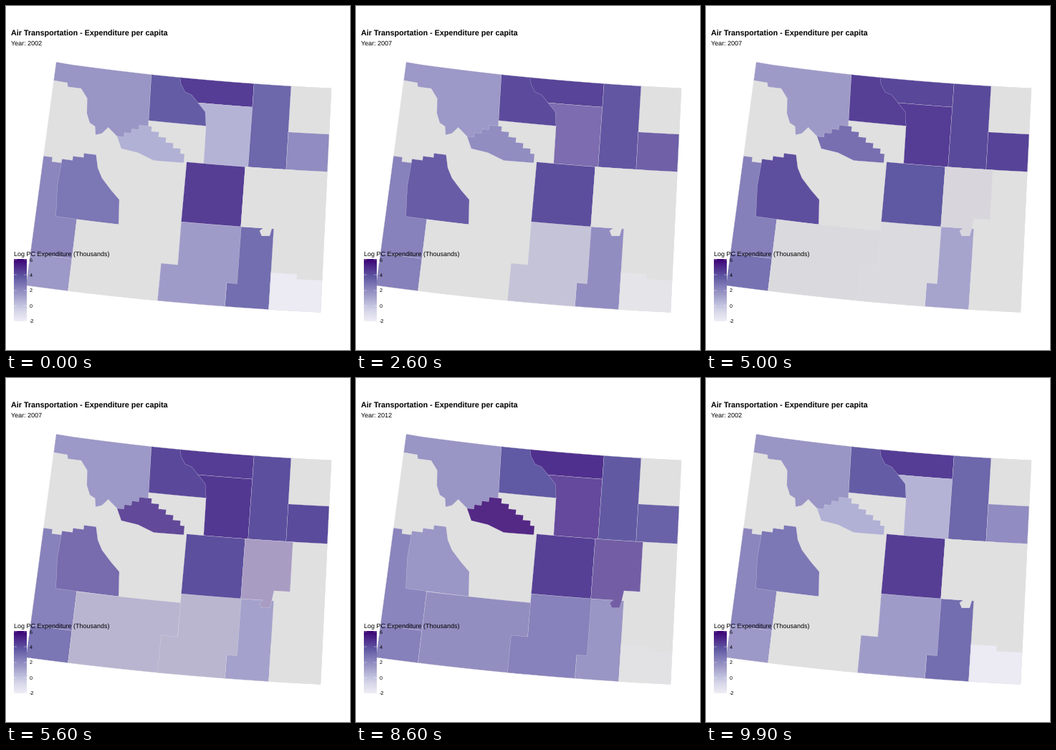
A matplotlib script for the animation above (10000 ms loop, 480 by 480 pixels).

```python
import numpy as np
import matplotlib.pyplot as plt
from matplotlib.animation import FuncAnimation
from matplotlib.colors import LinearSegmentedColormap, to_rgb
from matplotlib.patches import Polygon

plt.rcParams["font.family"] = "Liberation Sans"
plt.rcParams["text.hinting"] = "none"

SIZE, FRAMES, STEP = 480, 100, 100
NO_DATA = "#e0e0e0"
YEARS = ["2002", "2007", "2012"]
# (last still frame, arrival frame, frame where the label switches)
MOVES = [(16, 33, 26), (49, 66, 59), (83, 99, 92)]
RAMP = LinearSegmentedColormap.from_list("ramp", [
    "#efedf5", "#dadaeb", "#bcbddc", "#9e9ac8",
    "#7f7ab7", "#5f58a2", "#502f8e", "#3b0073"])


def project(pts, n=10):
    """Conic projection of degrees east and south of the state's NW corner."""
    pts = np.array(pts, float)
    t = np.linspace(0, 1, n, endpoint=False)[:, None]
    east, south = np.concatenate(
        [a + (b - a) * t for a, b in zip(pts, np.roll(pts, -1, axis=0))]).T
    angle = np.radians(7.69 - .7057 * east)
    r = 4475 + 78.25 * south
    return np.column_stack([668.7 - r * np.sin(angle), r * np.cos(angle) - 4355])


def box(w, e, n, s):
    return [(w, n), (e, n), (e, s), (w, s)]


def stairs(a, b, n):
    """Level treads with sharp rises from a to b."""
    xs, ys = np.linspace(a[0], b[0], n + 1), np.linspace(a[1], b[1], n + 1)
    return [a] + [(xs[k + 1], ys[k + j]) for k in range(n) for j in (0, 1)]


# Log spending in the three years (None = no data) and outline,
# painted in order so later counties cover the overlaps.
GRAY = (None, None, None)
COUNTIES = [
    (GRAY, box(0, 7, 0, 4)),
    (GRAY, box(5.98, 7, 0, .82)),         # Crook
    (GRAY, box(6.15, 7, 1.49, 2.38)),     # Niobrara
    (GRAY, box(6.37, 7, 2.38, 3.43)),     # Goshen
    (GRAY, box(5.76, 6.37, 2.38, 3.34)),  # Platte
    # Park
    ((1.6, 1.43, 1.6), [
        (0, -.02), (.4, -.01), (2.43, 0), (2.48, .82), (2.5, 1.1), (1.84, 1.24),
        (1.74, 1.16), (1.5, 1.02), (1.36, 1.14), (1.21, 1.18), (1.17, 1.03),
        (1.03, .98), (.93, .82), (.89, .55), (.71, .39), (.37, .39), (.35, .32),
        (0, .31)]),
    # Hot Springs
    ((.7, 2.74, 6),
     stairs((1.74, 1.16), (2.26, .92), 3) + stairs((2.385, .92), (3.34, 1.35), 5)
     + [(3.45, 1.35), (3.45, 1.51), (2.71, 1.52), (2.3, 1.41), (1.88, 1.37)]),
    # Sheridan
    ((4.45, 4.13, 4.88), box(3.16, 5.04, 0, .42)),
    # Johnson
    ((.6, 4.44, 4.8), [
        (3.67, .42), (5.04, .42), (5.04, 1.49), (3.94, 1.49), (3.92, .82)]),
    # Big Horn
    ((3.55, 4.41, 3.71), [
        (2.43, 0), (3.16, 0), (3.2, .12), (3.32, .25), (3.49, .29), (3.67, .42),
        (3.87, .57), (3.92, .82), (2.48, .82)]),
    # Campbell, Weston
    ((3.2, 4.1, 3.74), box(5.04, 5.98, 0, 1.49)),
    ((1.93, 4.33, 3.71), box(5.98, 7, .82, 1.49)),
    # Lincoln
    ((2.14, 2.36, 2.18),
     stairs((0, 1.67), (.22, 1.75), 1) + [(.8, 1.75), (1, 2.7), (1, 3.42), (0, 3.42)]),
    # Sublette
    ((2.67, 4.1, 1.33),
     stairs((.46, 1.68), (.98, 1.53), 2)
     + [(1.28, 1.53), (1.36, 1.76), (1.49, 1.93), (1.75, 2.13), (1.97, 2.28),
        (2.02, 2.72), (.49, 2.71), (.43, 2.17)]),
    # Uinta, Sweetwater, Albany
    ((1.53, 2.87, 2.5), box(0, 1, 3.42, 4)),
    ((None, None, 2.5), box(1, 3.53, 2.72, 4)),
    ((2.97, 1.1, 1.3), box(4.73, 5.77, 2.56, 4)),
    # Carbon
    ((1.4, None, 2.47),
     [(3.52, 2.56), (4.98, 2.56)] + box(4.98, 4.73, 3.58, 4)[:1]
     + [(4.73, 3.58), (4.73, 4), (3.13, 4), (3.13, 3.33), (3.53, 3.33)]),
    # Natrona
    ((4.41, 3.67, 4.35), box(3.52, 4.97, 1.49, 2.56)),
    # Laramie
    ((-1.8, None, None),
     stairs((5.77, 3.34), (6.39, 3.43), 1) + [(7, 3.43), (7, 4), (5.77, 4)]),
    # Converse
    ((None, None, 4.3), [
        (4.97, 1.49), (6.15, 1.49), (6.15, 2.38), (5.76, 2.38), (5.72, 2.56),
        (5.68, 2.69), (5.49, 2.7), (5.43, 2.61), (5.51, 2.56), (4.97, 2.56)]),
]

TO_XYZ = np.array([[.4124, .3576, .1805], [.2126, .7152, .0722], [.0193, .1192, .9505]])
WHITE = TO_XYZ.sum(axis=1)
TO_LAB = np.array([[0, 116, 0], [500, -500, 0], [0, 200, -200]])


def to_lab(rgb):
    rgb = np.asarray(rgb)
    lin = np.where(rgb > .04045, ((rgb + .055) / 1.055) ** 2.4, rgb / 12.92)
    t = lin @ TO_XYZ.T / WHITE
    f = np.where(t > .008856, np.cbrt(t), 7.787 * t + 16 / 116)
    return f @ TO_LAB.T - [16, 0, 0]


def to_srgb(lab):
    fy = (lab[..., 0] + 16) / 116
    f = np.stack([fy + lab[..., 1] / 500, fy, fy - lab[..., 2] / 200], axis=-1)
    t = np.where(f > .2069, f ** 3, (f - 16 / 116) / 7.787)
    lin = np.clip((t * WHITE) @ np.linalg.inv(TO_XYZ).T, 0, 1)
    return np.clip(np.where(lin > .0031308, 1.055 * lin ** (1 / 2.4) - .055, 12.92 * lin), 0, 1)


def fill(v):
    return to_rgb(NO_DATA) if v is None else RAMP((v + 2) / 8)[:3]


fig = plt.figure(figsize=(SIZE / 72, SIZE / 72), dpi=72, facecolor="white")
ax = fig.add_axes([0, 0, 1, 1])
ax.axis("off")

shapes = [ax.add_patch(Polygon(project(pts), closed=True, ec="#e4e4ea", lw=.25))
          for _, pts in COUNTIES]
labs = to_lab([[fill(v) for v in values] for values, _ in COUNTIES])

ax.imshow(np.linspace(1, 0, 256)[:, None], cmap=RAMP, aspect="auto",
          extent=(11.2, 28.5, 439.7, 353.3), interpolation="nearest", zorder=3)
ax.set(xlim=(0, SIZE), ylim=(SIZE, 0))


def label(x, y, s, size, **kw):
    return ax.text(x, y, s, fontsize=size, color="black", va="baseline", zorder=5, **kw)


for value in range(-2, 7, 2):
    y = 418 - value * 10.68
    label(32.8, y + 2.6, str(value), 7.2)
    for x in (11.2, 25):
        ax.plot([x, x + 3.5], [y, y], color="white", lw=.4, zorder=4)

label(6.6, 42, "Air Transportation - Expenditure per capita", 10.8, weight="bold")
year = label(6.6, 55, "Year: 2002", 9)
label(11, 349, "Log PC Expenditure (Thousands)", 9)


def draw(i):
    pose, shown = labs[:, 0], 0
    for k, (start, end, switch) in enumerate(MOVES):
        nxt = (k + 1) % 3
        if i > start:
            p = min((i - start) / (end - start), 1)
            pose = labs[:, k] * (1 - p) + labs[:, nxt] * p
        if i >= switch:
            shown = nxt
    for shape, rgb in zip(shapes, to_srgb(pose)):
        shape.set_facecolor(rgb)
    year.set_text("Year: " + YEARS[shown])
    return [*shapes, year]


anim = FuncAnimation(fig, draw, frames=FRAMES, interval=STEP, repeat=True,
                     repeat_delay=0, blit=False)
plt.show()
```
